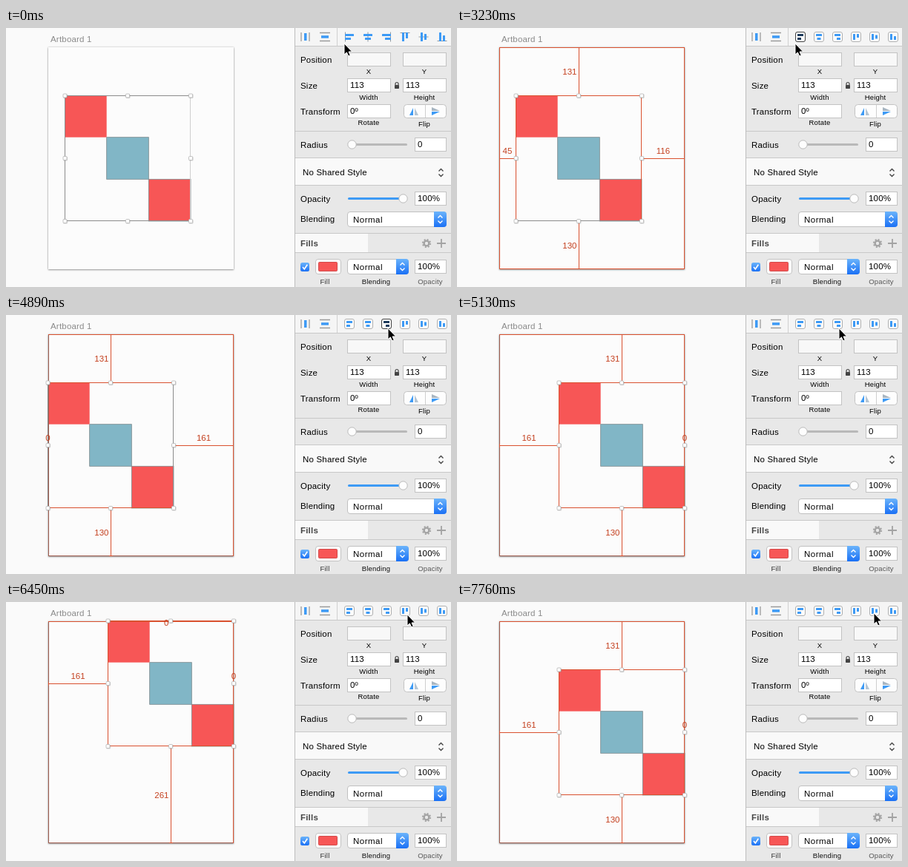
Write an HTML page that moves like this. It is 600x350 px and loops after 8 s.

```html
<!DOCTYPE html>
<html lang="en">
<head>
<meta charset="utf-8">
<title>Aligning layers on an artboard</title>
<style>
html, body { margin: 0; width: 100%; height: 100%; overflow: hidden; background: #fafafa; }
svg { display: block; width: 600px; height: 350px; }
text { font: 11.5px "Liberation Sans", Arial, sans-serif; letter-spacing: .2px; fill: #000; white-space: pre; }
.small { font-size: 9.5px; }
.mid { text-anchor: middle; }
.guide { fill: #c4401f; letter-spacing: 0; }
</style>
</head>
<body>
<svg id="stage" viewBox="0 0 600 350">
  <defs>
    <linearGradient id="blue" x2="0" y2="1"><stop stop-color="#6bb4fb"/><stop offset="1" stop-color="#1a70f5"/></linearGradient>
    <filter id="shadow" x="-20%" y="-20%" width="140%" height="140%"><feDropShadow dx="0" dy=".6" stdDeviation="1.3" flood-opacity=".55"/></filter>
  </defs>
</svg>
<script>
const LOOP = 8000;
const RED = '#f75656', TEAL = '#81b6c6', BLUE = '#3d9af5', GUIDE = '#d9512f', GRAY = '#8c8c8c';
const stage = document.getElementById('stage');

function add(parent, tag, attrs) {
  const el = document.createElementNS('http://www.w3.org/2000/svg', tag);
  for (const key in attrs) el.setAttribute(key, attrs[key]);
  return parent.appendChild(el);
}
const group = (parent = stage) => add(parent, 'g', {});
const rect = (p, x, y, width, height, fill, extra) => add(p, 'rect', { x, y, width, height, fill, ...extra });
const path = (p, d, stroke, width = 1, fill = 'none') =>
  add(p, 'path', { d, stroke, fill, 'stroke-width': width });
function text(p, str, x, y, cls = '', extra = {}) {
  add(p, 'text', { x, y, class: cls, ...extra }).textContent = str;
}

// Plays [time, value] steps as hard changes
function play(el, prop, steps) {
  const frames = steps.map(([t, v]) => ({ offset: t / LOOP, [prop]: v, easing: 'step-end' }));
  frames.push({ ...frames.at(-1), offset: 1 });
  el.animate(frames, { duration: LOOP, iterations: Infinity });
}
function show(el, ...spans) {
  const steps = spans[0][0] ? [[0, 0]] : [];
  for (const [from, to] of spans) {
    steps.push([from, 1]);
    if (to < LOOP) steps.push([to, 0]);
  }
  play(el, 'opacity', steps);
}

// Canvas
const board = { l: 57, t: 26, r: 307, b: 326 };
rect(stage, board.l, board.t, board.r - board.l, board.b - board.t, '#fcfcfc', { filter: 'url(#shadow)' });
text(stage, 'Artboard 1', 60, 19, '', { style: 'fill:#8a8a8a' });

function pose(x, y, spans, dist, redSides = '') {
  const g = group(), size = 170, cell = size / 3;
  const r = x + size, b = y + size, cx = x + size / 2, cy = y + size / 2;
  const { l, t, r: R, b: B } = board;
  [RED, TEAL, RED].forEach((fill, i) => rect(g, x + i * cell, y + i * cell, cell, cell, fill,
    { stroke: i ? '#7f8a8e' : 'none', 'stroke-width': .8 }));
  if (dist) {
    path(g, `M${l + .5} ${t}V${B}M${l} ${B - .5}H${R}`, redSides.includes('b') ? '#9d5a4c' : GUIDE);
    path(g, `M${l} ${t + .5}H${R}M${R - .5} ${t}V${B}`, GUIDE);
  }
  const sides = {
    t: `M${x} ${y + .5}H${r}`, r: `M${r - .5} ${y}V${b}`,
    b: `M${x} ${b - .5}H${r}`, l: `M${x + .5} ${y}V${b}`
  };
  for (const s in sides) path(g, sides[s], redSides.includes(s) ? GUIDE : !dist && s === 'r' ? '#cfcfcf' : GRAY);
  if (dist) {
    const [top, right, bottom, left] = dist;
    path(g, `M${cx + .5} ${t}V${y}M${cx + .5} ${b}V${B}M${l} ${cy + .5}H${x}M${r} ${cy + .5}H${R}`, GUIDE);
    path(g, `M${cx - 2} ${B - .5}h5M${cx - 2} ${t + .5}h5M${l + .5} ${cy - 2}v5M${R - .5} ${cy - 2}v5`, GUIDE);
    const end = { 'text-anchor': 'end' };
    text(g, top, cx - 2.5, (t + y) / 2 + (y < t ? 6 : 4.5), 'guide', end);
    text(g, bottom, cx - 2.5, (b + B) / 2 + 4.5, 'guide', end);
    text(g, left, (l + x) / 2, cy - 6, 'guide mid');
    text(g, right, (r + R) / 2, cy - 6, 'guide mid');
  }
  for (const hx of [x + .5, cx, r]) for (const hy of [y + .5, cy, b]) {
    if (hx === cx && hy === cy) continue;
    rect(g, hx - 2.5, hy - 2.5, 6, 6, '#777', { rx: 1.5, opacity: .35 });
    rect(g, hx - 2.5, hy - 2.5, 5, 5, '#fdfdfd', { rx: 1, stroke: '#b5b5b5', 'stroke-width': .8 });
  }
  show(g, ...spans);
}
pose(79, 91, [[0, 1920]]);
pose(79, 91, [[1920, 3350]], ['131', '116', '130', '45'], 'ltr');
pose(56, 91, [[3350, 5130]], ['131', '161', '130', '0'], 'tb');
pose(137, 91, [[5130, 6450], [7760, LOOP]], ['131', '0', '130', '161'], 'ltrb');
pose(137, 25, [[6450, 7760]], ['0', '0', '261', '161'], 'ltrb');

// Inspector
const panel = group();
rect(panel, 390, 0, 210, 350, '#e8e8e8');
rect(panel, 390, 0, 210, 24, '#f5f5f5');
rect(panel, 390, 176, 210, 37, '#f9f9f9');
rect(panel, 390, 278, 98, 26, '#f9f9f9');
path(panel, 'M389.5 0V350', '#bdbdbd');
path(panel, 'M390 24.5H600M390 139.5H600M390 175.5H600M390 212.5H600M390 277.5H600M390 303.5H600', '#c8c8c8');
path(panel, 'M446.5 0V24', '#d0d0d0');

function field(x, y, w, str = '', h = 18) {
  rect(panel, x + .5, y + .5, w - 1, h, str ? '#fff' : '#f8f8f8', { stroke: '#c3c3c3' });
  text(panel, str, x + 4, y + 13 + (h - 18) / 2);
}
const chevrons = (x, y, color) =>
  path(panel, `M${x - 3} ${y - 2}l3 -3l3 3M${x - 3} ${y + 2}l3 3l3 -3`, color, 1.4);
function popup(x, y, w, h) {
  rect(panel, x + .5, y + .5, w - 1, h - 1, '#fff', { rx: 3.5, stroke: '#c0c0c0' });
  const bx = x + w - 17;
  path(panel, `M${bx} ${y}h13q4 0 4 4v${h - 8}q0 4 -4 4h-13z`, 'none', 0, 'url(#blue)');
  chevrons(bx + 8.5, y + h / 2, '#fff');
  text(panel, 'Normal', x + 8, y + h / 2 + 4, '', { style: 'letter-spacing:.5px' });
}
const knob = (cx, cy) => add(panel, 'circle', { cx, cy, r: 5.7, fill: '#fdfdfd', stroke: '#b9b9b9' });

[['Position', 47], ['Size', 82], ['Transform', 117], ['Radius', 162], ['Opacity', 235], ['Blending', 262]]
  .forEach(([str, y]) => text(panel, str, 397, y));
[['X', 489, 62], ['Y', 564, 62], ['Width', 489, 97], ['Height', 564, 97], ['Rotate', 489, 131], ['Flip', 564, 133]]
  .forEach(([str, x, y]) => text(panel, str, x, y, 'small mid'));
[['Fill', 430, '#333'], ['Blending', 499, '#111'], ['Opacity', 572, '#555']]
  .forEach(([str, x, c]) => text(panel, str, x, 346, 'small mid', { style: 'fill:' + c }));

field(460, 33, 59);
field(535, 33, 59);
field(460, 68, 59, '113');
field(535, 68, 59, '113');
field(460, 103, 59, '0º');
field(551, 148, 43, '0');
field(551, 221, 43, '100%');
field(551, 313, 43, '100%');

rect(panel, 524, 77, 6, 5, '#444', { rx: .7 });
path(panel, 'M525 77v-1.5a2 2 0 0 1 4 0v1.5', '#444', 1.2);

rect(panel, 536.5, 103.5, 57, 18, '#fdfdfd', { rx: 4, stroke: '#c3c3c3' });
path(panel, 'M565.5 104V121', '#cfcfcf');
path(panel, 'M544 118h5v-10z', 'none', 0, BLUE);
path(panel, 'M551 118h5l-5 -10z', 'none', 0, '#b5c5d3');
path(panel, 'M574 107v5h11z', 'none', 0, '#a9b6c1');
path(panel, 'M574 118v-5h11z', 'none', 0, BLUE);

rect(panel, 461, 156, 80, 3, '#b9b9b9', { rx: 1.5 });
knob(466.5, 157.5);
rect(panel, 461, 229, 74, 3, BLUE, { rx: 1.5 });
knob(535.5, 230.5);

text(panel, 'No Shared Style', 400, 199);
chevrons(586.5, 195.5, '#444');
popup(460, 248, 134, 21);

text(panel, 'Fills', 397, 295, '', { style: 'font-weight:bold;fill:#444' });
add(panel, 'circle', { cx: 567, cy: 291, r: 3.4, fill: 'none', stroke: '#a3a3a3', 'stroke-width': 2.4 });
add(panel, 'circle', { cx: 567, cy: 291, r: 5.2, fill: 'none', stroke: '#a3a3a3', 'stroke-width': 1.8, 'stroke-dasharray': '2.04 2.04' });
path(panel, 'M581 291h12M587 285v12', '#a3a3a3', 1.8);

rect(panel, 397, 317, 12, 12, 'url(#blue)', { rx: 2.5 });
path(panel, 'M400 323l2.3 2.8l4 -6', '#fff', 1.6);
rect(panel, 417.5, 312.5, 34, 20, '#fdfdfd', { rx: 3.5, stroke: '#c3c3c3' });
rect(panel, 421.5, 316.5, 25, 12, RED, { rx: 1, stroke: '#d34a4a' });
popup(460, 312, 83, 21);

// Toolbar
path(panel, 'M398 6V18M409 6V18M423 6.5H437M423 17.5H437', '#9b9b9b', 1.3);
rect(panel, 402, 7, 3.5, 10, BLUE);
rect(panel, 425, 10.2, 10, 3.5, BLUE);

function alignIcon(parent, i, framed, color) {
  const a = i % 3, g = group(parent);
  const turn = i > 2 ? ' matrix(0 1 1 0 0 0)' : '';
  g.setAttribute('transform', `translate(${463 + 25 * i} 12)${turn}`);
  const half = framed ? 4 : 6, lens = framed ? [8, 5] : [12, 8];
  if (framed) {
    rect(g, -6.5, -6.5, 13, 13, '#fbfbfb', { rx: 2.5, stroke: color === BLUE ? '#b0b0b0' : '#444' });
  } else {
    const lx = (a - 1) * 5.5;
    path(g, `M${lx} -6.5V6.5`, '#8f9aa3', 1);
  }
  lens.forEach((len, n) => {
    const x = [-half, -len / 2, half - len][a];
    rect(g, x, n ? 1 : -4, len, 3, color, { rx: .5 });
  });
}
const plain = group(), framed = group();
for (let i = 0; i < 6; i++) {
  alignIcon(plain, i, false, BLUE);
  alignIcon(framed, i, true, BLUE);
}
show(plain, [0, 1920]);
show(framed, [1920, LOOP]);
[[0, 3230, 3350], [2, 4890, 5130], [3, 6330, 6450], [4, 7640, 7760]].forEach(([i, from, to]) => {
  const g = group();
  alignIcon(g, i, true, '#1d3b5c');
  show(g, [from, to]);
});

// Tooltip and pointer
const tip = group();
rect(tip, 457, 41, 63, 20.5, '#000', { rx: 1.5, opacity: .18 });
rect(tip, 457, 40, 62.5, 20, '#efefef', { rx: 1, stroke: '#cdcdcd', 'stroke-width': .8 });
text(tip, 'Align Left', 463, 54);
show(tip, [960, 3230]);

const cursor = group();
path(cursor, 'M0 0V15L3.4 11.9L5.7 17L8.2 15.9L6 11H10.6Z', '#fff', 1, '#000');
play(cursor, 'transform', [
  [0, 456, 21], [4060, 468, 21], [4180, 478, 22], [4300, 490, 21], [4420, 502, 20], [4540, 511, 19], [4660, 515, 18],
  [5610, 520, 19], [5730, 530, 19], [5850, 538, 18], [5970, 541, 17],
  [7290, 548, 16], [7410, 557, 16], [7530, 562, 15]
].map(([t, x, y]) => [t, `translate(${x}px, ${y}px)`]));
</script>
</body>
</html>
```
